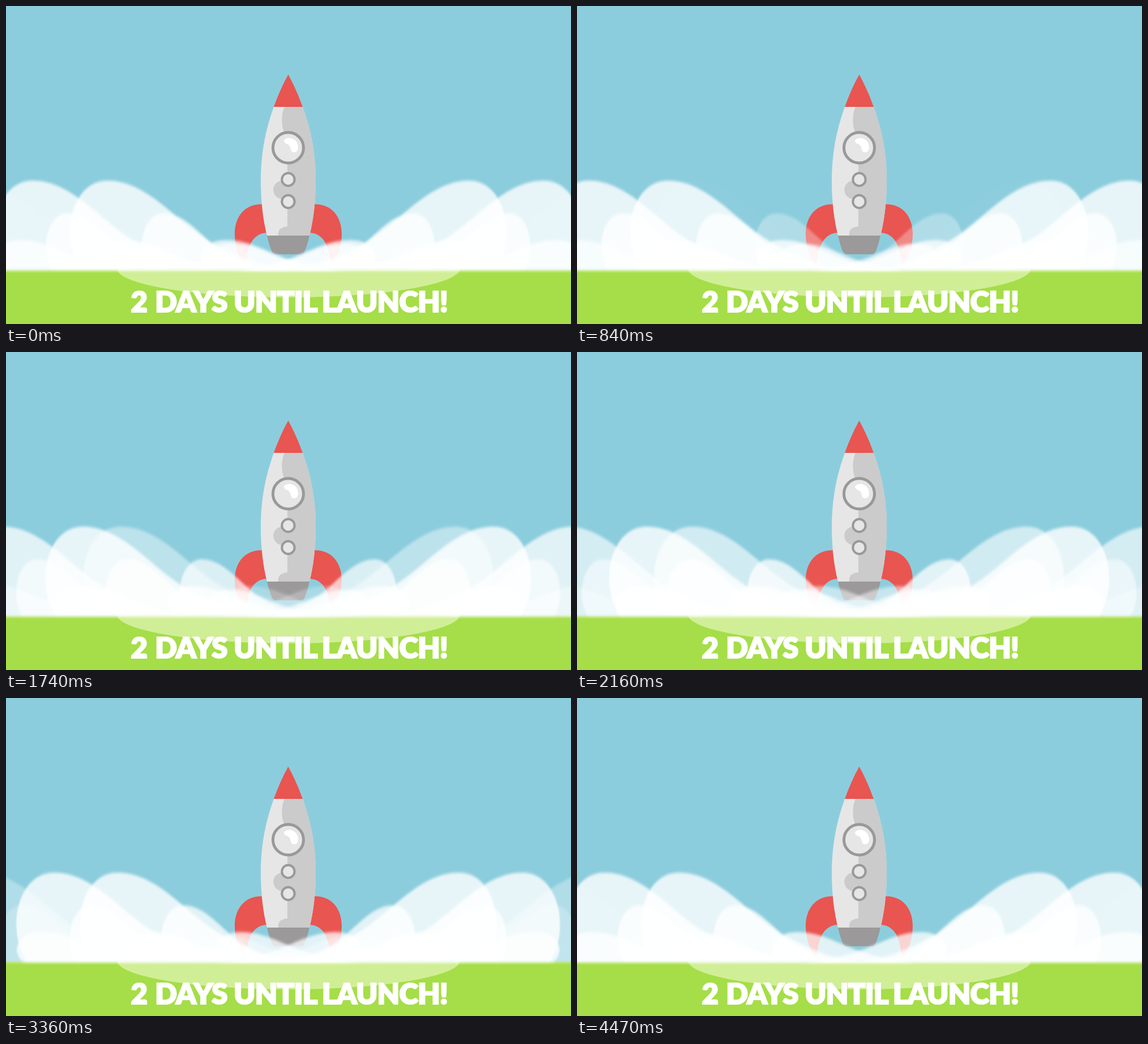
An HTML page that plays this animation: 998 px wide and 561 px high, repeating every 4500 ms.

```html
<!DOCTYPE html>
<html lang="en">
<head>
<meta charset="utf-8">
<title>Launch countdown</title>
<style>
  html, body { margin: 0; width: 100%; height: 100%; overflow: hidden; background: #8ccddd; }
  svg { display: block; width: 998px; height: 561px; }
  text { font: 900 51px Lato, sans-serif; letter-spacing: -.8px; fill: #fff; stroke: #fff; stroke-width: 2.2; text-anchor: middle; }
</style>
</head>
<body>
<svg viewBox="0 0 998 561">
  <defs>
    <filter id="soft" filterUnits="userSpaceOnUse" x="-300" y="270" width="1300" height="230" color-interpolation-filters="sRGB">
      <feGaussianBlur stdDeviation=".8 2.7"/>
    </filter>
    <clipPath id="ground"><rect y="464" width="998" height="97"/></clipPath>
    <clipPath id="hull"><path d="M473 178H524C540 222 547 264 547 308C547 344 543 378 536 405H461C454 378 450 344 450 308C450 264 457 222 473 178Z"/></clipPath>
    <path id="fin" d="M456 350C424 347 404 370 404 402C404 426 412 446 424 463C424 428 434 399 464 400Z"/>
  </defs>

  <rect width="998" height="561" fill="#8ccddd"/>
  <rect y="464" width="998" height="97" fill="#a5de48"/>
  <ellipse cx="499" cy="463" rx="303" ry="51" fill="#d0ee96" clip-path="url(#ground)"/>

  <g fill="#e95551">
    <use href="#fin"/>
    <use href="#fin" transform="translate(997) scale(-1 1)"/>
    <path d="M498.5 121Q484.5 146 473 178H524Q512.5 146 498.5 121Z"/>
  </g>
  <path d="M461 405H536Q532 423 527 434Q525 438 521 438H476Q472 438 470 434Q465 423 461 405Z" fill="#9b999a"/>
  <g clip-path="url(#hull)">
    <rect x="445" y="178" width="110" height="227" fill="#e6e6e6"/>
    <path d="M492 178C486 190 486 210 491 222L497 232V308C464 303 464 345 497 341V389C492 389 490 390 489 391C483 392 480 398 481 405H555V178Z" fill="#cbcbcb"/>
  </g>
  <g fill="#e6e6e6" stroke="#999">
    <circle cx="498.5" cy="250" r="27" stroke-width="5"/>
    <circle cx="498.5" cy="306" r="11.2" stroke-width="4"/>
    <circle cx="498.5" cy="345" r="11.2" stroke-width="4"/>
  </g>
  <path d="M491 237C497 230 509 232 514 241C518 249 516 258 509 258C502 258 504 252 501 247C498 242 491 244 491 237Z" fill="#fff"/>

  <g id="smoke" fill="#fff" filter="url(#soft)"></g>
  <use href="#smoke" transform="translate(997) scale(-1 1)"/>

  <g>
    <text x="235" y="540">2</text>
    <text x="327" y="540">DAYS</text>
    <text x="476" y="540">UNTIL</text>
    <text x="669" y="540">LAUNCH!</text>
  </g>
</svg>

<script>
const LOOP = 4.5, BASE = 467;
const PUFF = 'M-48 0C-86-60-64-159 0-159C70-159 120-87 180-52S290-2 330 0Z';

// Each puff drifts outwards with an eased move; times in seconds may span several loops.
const puffs = [
  { sx: 1, sy: 1, from: 203, travel: 265, start: 2.3, span: 12, alpha: .8, fadeIn: [.8, 2.6], fadeOut: [10.5, 13.6] },
  { sx: .58, sy: .637, from: 353, travel: 328, start: .65, span: 12.5, alpha: .75, fadeIn: [.1, 1.9], fadeOut: [10, 13.4] },
  { sx: .66, sy: .34, from: 430, travel: 460, start: 1.7, span: 15, alpha: .75, fadeIn: [1.3, 2.6], fadeOut: [14, 16.7] },
  { sx: .6, sy: .3, from: 398, travel: 13, start: 0, span: 4.5, alpha: .7, fadeIn: [-1, 0], fadeOut: [2.4, 4.4] },
];

const ramp = (t, a, b) => Math.max(0, Math.min(1, (t - a) / (b - a)));
const ease = u => u * u * (3 - 2 * u);

const smoke = document.getElementById('smoke');
const clouds = puffs.flatMap(puff => [3, 2, 1, 0].map(lap => {
  const el = document.createElementNS('http://www.w3.org/2000/svg', 'path');
  el.setAttribute('d', PUFF);
  smoke.append(el);
  return { ...puff, lap, el };
}));

function draw() {
  const now = performance.now() / 1000 % LOOP;
  for (const c of clouds) {
    const t = now + c.lap * LOOP;
    const x = c.from - c.travel * ease(ramp(t, c.start, c.start + c.span));
    c.el.setAttribute('opacity', c.alpha * ramp(t, ...c.fadeIn) * (1 - ramp(t, ...c.fadeOut)));
    c.el.setAttribute('transform', `translate(${x} ${BASE}) scale(${c.sx} ${c.sy})`);
  }
  requestAnimationFrame(draw);
}
draw();
</script>
</body>
</html>
```
